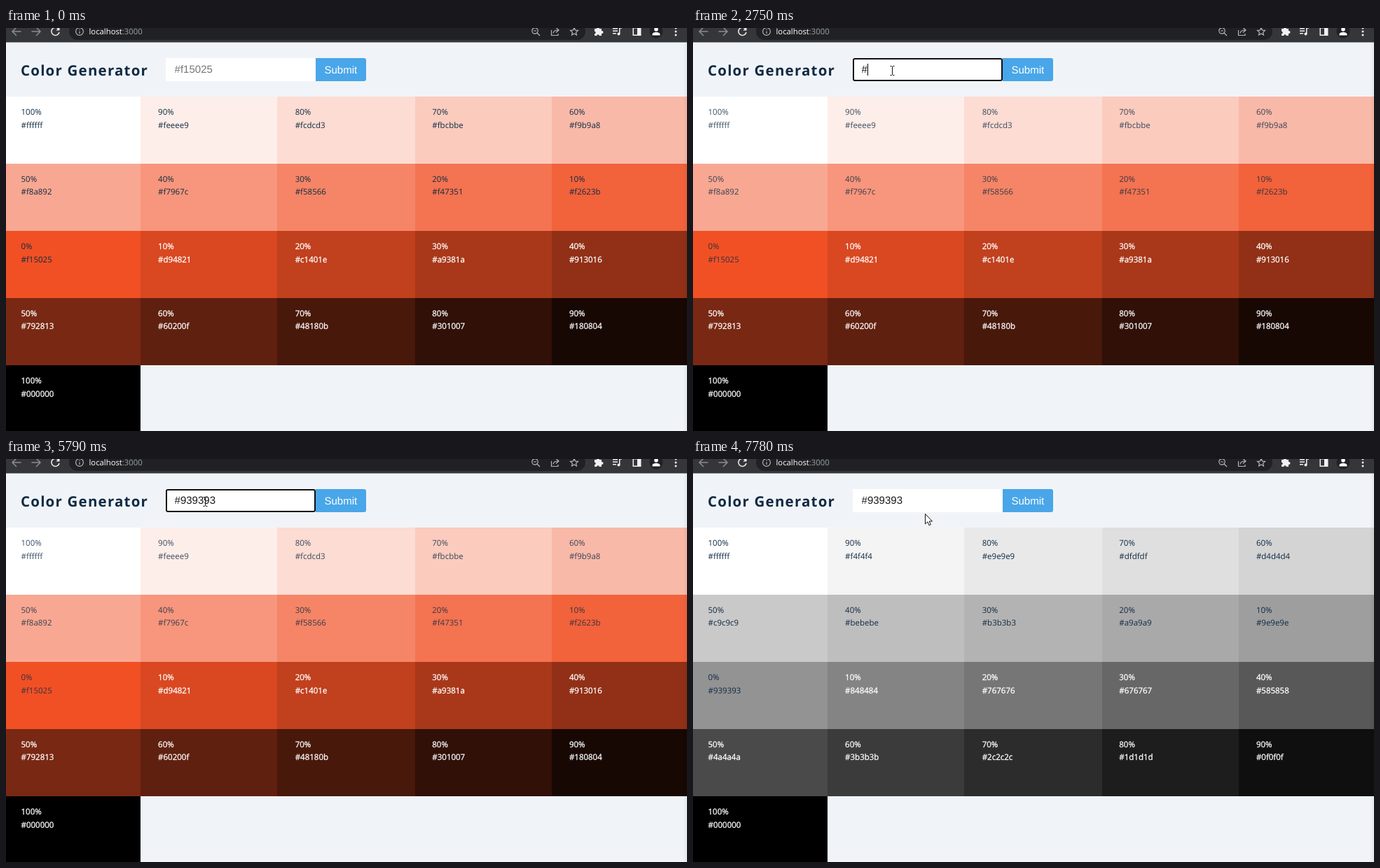
Write an HTML page that moves like this. It is 972x576 px and loops after 8000 ms.

```html
<!DOCTYPE html>
<html lang="en">
<head>
<meta charset="utf-8">
<title>Color Generator</title>
<style>
html, body { margin: 0; width: 100%; height: 100%; overflow: hidden; background: #f0f4f8; }
body { position: relative; text-rendering: geometricPrecision; }
svg, .field, .field * { position: absolute; }
#page { left: 0; top: 0; font: 11.5px "Open Sans", "Noto Sans", sans-serif; }
.title { font-size: 20.5px; font-weight: 700; letter-spacing: 1.2px; fill: #102a42; }
.button { font: 15px "Liberation Sans", Arial, sans-serif; fill: #fff; }
.light { fill: #fff; stroke: #fff; stroke-width: .3px; }
.dark { animation-name: ink; fill: #102a42; }
.line { fill: none; stroke-width: 1.5; }

.dark, #gray, .ring, .hint, .typed, .caret, .cursor {
  animation-duration: 8s;
  animation-delay: -5ms;
  animation-timing-function: step-end;
  animation-iteration-count: infinite;
}
#gray { animation-name: gray; }

.field { left: 228px; top: 43px; width: 214px; height: 33px; background: #fff; font: 15px/17px "Liberation Sans", Arial, sans-serif; }
.ring { inset: 0; box-sizing: border-box; border: 2px solid #101010; border-radius: 3px; outline: 1px solid #f0f4f8; outline-offset: -1px; outline: none; animation-name: ring; }
.hint, .typed { left: 12.6px; top: 8px; height: 17px; white-space: nowrap; overflow: hidden; }
.hint { color: #757575; animation-name: hint; }
.typed { color: #1a1a1a; animation-name: typed; }
.caret { top: 8px; width: 1px; height: 17px; background: #000; animation-name: caret, blink; }

.cursor { left: 0; top: 0; overflow: visible; stroke-linejoin: round; }
.arrow { animation-name: arrow; }
.beam { animation-name: beam; }
.hand { animation-name: hand; }

@keyframes ink { 0% { fill-opacity: 1; } 12.625% { fill-opacity: .82; } 84.875%, to { fill-opacity: 1; } }
@keyframes gray { 0% { opacity: 0; } 84.875%, to { opacity: 1; } }
@keyframes ring { 0% { opacity: 0; } 12.625% { opacity: 1; } 84.875%, to { opacity: 0; } }
@keyframes hint { 0% { opacity: 1; } 34.375%, to { opacity: 0; } }
@keyframes typed {
  0% { width: 0; } 34.375% { width: 1ch; } 53.375% { width: 3ch; } 56.5% { width: 4ch; }
  59.75% { width: 5ch; } 66.125%, to { width: 8ch; }
}
@keyframes caret {
  0% { left: 13px; } 34.375% { left: 21px; } 53.375% { left: 37px; } 56.5% { left: 46px; }
  59.75% { left: 54px; } 66.125%, to { left: 71px; }
}
@keyframes blink {
  0%, 18.75%, 31.25%, 40.75%, 72.375%, 84.875%, to { opacity: 0; }
  12.625%, 25%, 34.375%, 47.125%, 78.5% { opacity: 1; }
}
@keyframes arrow {
  0%, 6.125%, 78.5% { transform: translate(-99px, 0); }
  3.125% { transform: translate(404px, 148px); }
  75.5% { transform: translate(426px, 82px); }
  91.125% { transform: translate(509px, 187px); }
  94.25% { transform: translate(333px, 96px); }
  97.25%, to { transform: translate(331px, 78px); }
}
@keyframes beam {
  0%, 75.5%, to { transform: translate(-99px, 0); }
  6.125% { transform: translate(285px, 57px); }
  9.375% { transform: translate(272px, 50px); }
  12.625% { transform: translate(281px, 54px); }
}
@keyframes hand {
  0%, 91.125%, to { transform: translate(-99px, 0); }
  78.5% { transform: translate(501px, 55px); }
  81.5% { transform: translate(470px, 57px); }
}
</style>
</head>
<body>
<svg id="page" width="972" height="576" viewBox="0 0 972 576">
  <defs>
    <linearGradient id="edge">
      <stop offset="0" stop-color="#000" stop-opacity="0"/>
      <stop offset="1" stop-color="#000" stop-opacity=".05"/>
    </linearGradient>
  </defs>
  <rect width="972" height="576" fill="#f0f4f8"/>

  <!-- browser bar -->
  <rect width="972" height="20.5" fill="#35363a"/>
  <rect x="90" y="-7" width="737" height="24" rx="12" fill="#202124"/>
  <g class="line" stroke="#8b8c8f">
    <path d="M21.5 5H9.5M15-1L9 5l6 6M36.500 5H48.500M43-1l6 6-6 6"/>
  </g>
  <path class="line" d="M75 1.500A5.600 5.600 0 1 0 76 6" stroke="#f1f1f1"/>
  <path d="M76.500-1.500V3.500H71.500z" fill="#f1f1f1"/>
  <g class="line" stroke="#b4b6b9" style="stroke-width:1.2">
    <circle cx="105" cy="5" r="5.400"/>
    <path d="M105 4.500V8M105 1.800V3"/>
    <circle cx="755" cy="4" r="4.200"/>
    <path d="M758 7l4 4M753 4h4"/>
    <path d="M778.500 3v7.500h9.500V8M781 7.500c.5-3.500 3-4.500 7-4.500M785-.5l4 3.500-4 3.500"/>
    <path d="M811-.5l1.600 3.600 3.900.4-2.900 2.600.8 3.900-3.400-2-3.400 2 .8-3.900-2.900-2.600 3.900-.4z"/>
  </g>
  <g fill="#f1f1f1">
    <path d="M840 1h10v10h-10z"/>
    <circle cx="845" cy="0" r="2"/><circle cx="850.500" cy="6" r="2"/>
    <circle cx="874.500" cy="8.500" r="2"/>
    <path d="M866 0h7v1.500h-7zM866 3.500h7v1.500h-7zM866 7h5v1.500h-5zM875-1h4v1.700h-2.500V8.500H875z"/>
    <path d="M894.500-1h12v12h-12zM896 .5v9h5v-9z" fill-rule="evenodd"/>
    <circle cx="956" cy="0" r="1.500"/><circle cx="956" cy="5" r="1.500"/><circle cx="956" cy="10" r="1.500"/>
  </g>
  <g fill="#35363a"><circle cx="840" cy="6.500" r="1.700"/><circle cx="845" cy="11" r="1.700"/></g>
  <circle cx="928" cy="5" r="9.500" fill="#202124"/>
  <path d="M922.500 10.500V9c0-4 11-4 11 0v1.500z" fill="#fff"/><circle cx="928" cy="2" r="2.800" fill="#fff"/>
  <text x="118.500" y="9" font-size="11.300" fill="#fff">localhost<tspan fill="#9aa0a6">:3000</tspan></text>

  <text class="title" x="21" y="68">Color Generator</text>
  <path d="M442 43h69a3 3 0 0 1 3 3v27a3 3 0 0 1-3 3h-69z" fill="#49a6e9"/>
  <text class="button" x="454.500" y="65">Submit</text>

  <g id="orange"></g>
  <g id="gray"></g>
  <rect x="966" y="20.500" width="6" height="556" fill="url(#edge)"/>
</svg>

<div class="field">
  <div class="ring"></div>
  <span class="hint">#f15025</span>
  <span class="typed">#939393</span>
  <i class="caret"></i>
</div>

<svg class="cursor arrow" width="16" height="21">
  <path d="M.5.5V14.800L3.800 11.800 6 16.800 8.300 15.800 6.200 11H10.500z" fill="#fff" stroke="#111"/>
</svg>
<svg class="cursor beam" width="8" height="14">
  <path d="M.5.5H2.500L3.500 1.500 4.500.5H6.500M3.500 1V13M.5 13.500H2.500L3.500 12.500 4.500 13.500H6.500" fill="none" stroke="#111"/>
</svg>
<svg class="cursor hand" width="16" height="21">
  <path d="M4.500 11.500V2Q4.500.5 6 .5T7.500 2V6.500Q9 5.500 10 7 11.500 6.300 12.400 7.700 14.500 7.300 14.500 9.500V13Q14.500 15 13 17V19.500H6V17.500L1 11.500Q.2 9.800 1.800 9.300 3 9.200 4.500 11.500z" fill="#fff" stroke="#111"/>
  <path d="M7.500 6.500V10M10 7V10M12.400 7.700V10.500" stroke="#111" fill="none"/>
</svg>

<script>
const lefts = [0, 192, 387, 584, 779, 972];

const mix = (rgb, to, p) => '#' + rgb.map(c =>
  Math.round((c * (100 - p) + to * p) / 100).toString(16).padStart(2, '0')).join('');

function swatch(color, p, i) {
  const col = i % 5, row = Math.floor(i / 5);
  const x = lefts[col], y = 98 + row * 96;
  const tx = 21.500 + col * 195.600;
  const ink = i > 10 ? 'light' : 'dark';
  return `<rect x="${x}" y="${y}" width="${lefts[col + 1] - x}" height="96" fill="${color}"/>
    <text class="${ink}" x="${tx}" y="${y + 26}">${p}%</text>
    <text class="${ink}" x="${tx}" y="${y + 45 - row % 2}">${color}</text>`;
}

// tints from white down to the base, then shades down to black
function palette(id, rgb) {
  let out = '';
  for (let i = 0; i <= 20; i++) {
    const p = Math.abs(100 - i * 10);
    out += swatch(mix(rgb, i > 10 ? 0 : 255, p), p, i);
  }
  document.getElementById(id).innerHTML = out;
}

palette('orange', [241, 80, 37]);
palette('gray', [147, 147, 147]);
</script>
</body>
</html>
```
